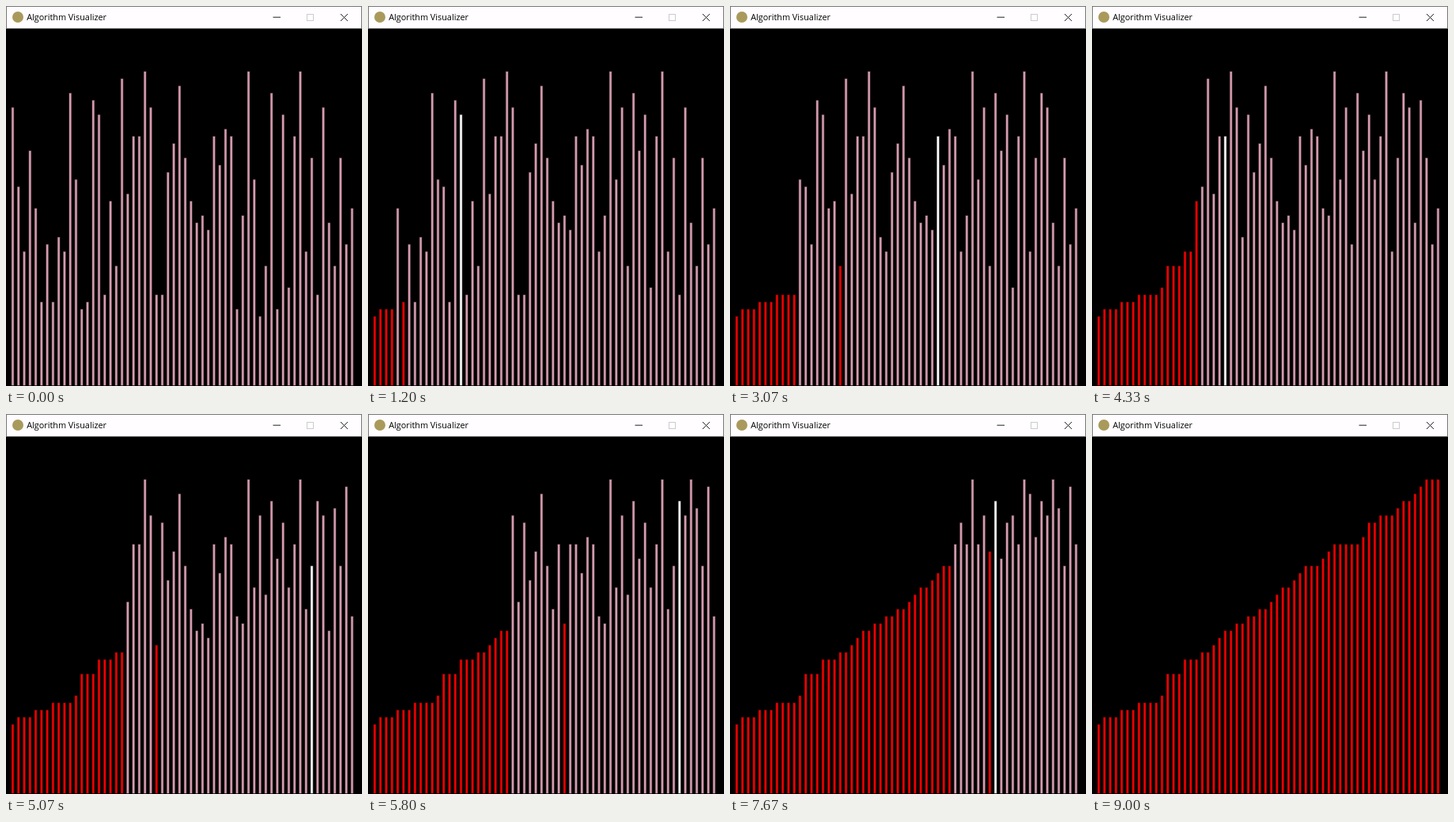
These frames come from a looping animation (450 px wide and 480 px high, 9.34 s). An HTML page:

```html
<!DOCTYPE html>
<html lang="en">
<head>
<meta charset="utf-8">
<title>Algorithm Visualizer</title>
<style>
  html, body { margin: 0; width: 100%; height: 100%; overflow: hidden; background: #000; }
  svg { display: block; width: 450px; height: 480px; }
  text { font: 10.85px "Open Sans", "Noto Sans", sans-serif; }
</style>
</head>
<body>
<svg viewBox="0 0 450 480">
  <rect width="450" height="480"/>
  <rect width="450" height="28.4" fill="#fffdff"/>
  <path d="M0 .5H450M.5 0V28M449.5 0V28" stroke="#777"/>
  <circle cx="15" cy="14" r="7" fill="#a99a5c"/>
  <text x="26.2" y="18">Algorithm Visualizer</text>
  <g fill="none" stroke="#222">
    <path d="M337.5 14.2H347"/>
    <rect x="380.5" y="10.5" width="8" height="8" stroke="#ccc"/>
    <path d="M423 10L432 19M432 10L423 19"/>
  </g>
  <g id="bars" stroke-width="1.2" stroke-opacity=".35"></g>
</svg>
<script>
const LOOP = 9340, FPS = 15, STEPS_PER_MS = 0.2016;
const PINK = '#d59caf', RED = '#f00000', WHITE = '#fff';

// The list to sort: how far each bar is below the tallest, in units
const UNIT = 9.1, TOP = 83, BOTTOM = 479;
const input = [
  5, 16, 25, 11, 19, 32, 24, 32, 23, 25, 3, 15, 33, 32, 4, 6, 31, 18, 27, 1,
  17, 9, 9, 0, 5, 31, 31, 14, 10, 2, 12, 18, 21, 20, 22, 9, 13, 8, 9, 33,
  20, 0, 15, 34, 27, 3, 33, 6, 30, 9, 0, 25, 12, 31, 5, 21, 27, 12, 24, 19
];
const count = input.length;

const setAll = (el, attrs) => {
  for (const key in attrs) el.setAttribute(key, attrs[key]);
};

const bars = input.map((_, i) => {
  const bar = document.createElementNS('http://www.w3.org/2000/svg', 'rect');
  setAll(bar, { x: 7.3 + i * 7.27, width: 2.4 });
  return document.getElementById('bars').appendChild(bar);
});

// Selection sort, stopped after the given number of comparisons
function sortFor(steps) {
  const a = [...input];
  if (!steps) return { a, i: 0 };
  for (let i = 0; i < count; i++) {
    let min = i;
    for (let j = i + 1; j < count; j++) {
      if (a[j] > a[min]) min = j;
      if (!--steps) return { a, i, j, min };
    }
    [a[i], a[min]] = [a[min], a[i]];
  }
  return { a, i: count };
}

function draw() {
  const t = performance.now() % LOOP;
  // Screen updates fall on 10 ms marks, 15 times a second
  const tick = Math.floor((Math.floor(t / 10) * 10 + 4) * FPS / 1000);
  const shown = Math.round(tick * 100 / FPS) * 10;
  const { a, i, j, min } = sortFor(Math.floor(shown * STEPS_PER_MS));
  bars.forEach((bar, n) => {
    const y = TOP + a[n] * UNIT;
    const color = n < i || n === min ? RED : n === j ? WHITE : PINK;
    setAll(bar, { y, height: BOTTOM - y, fill: color, stroke: color });
  });
  requestAnimationFrame(draw);
}
draw();
</script>
</body>
</html>
```
